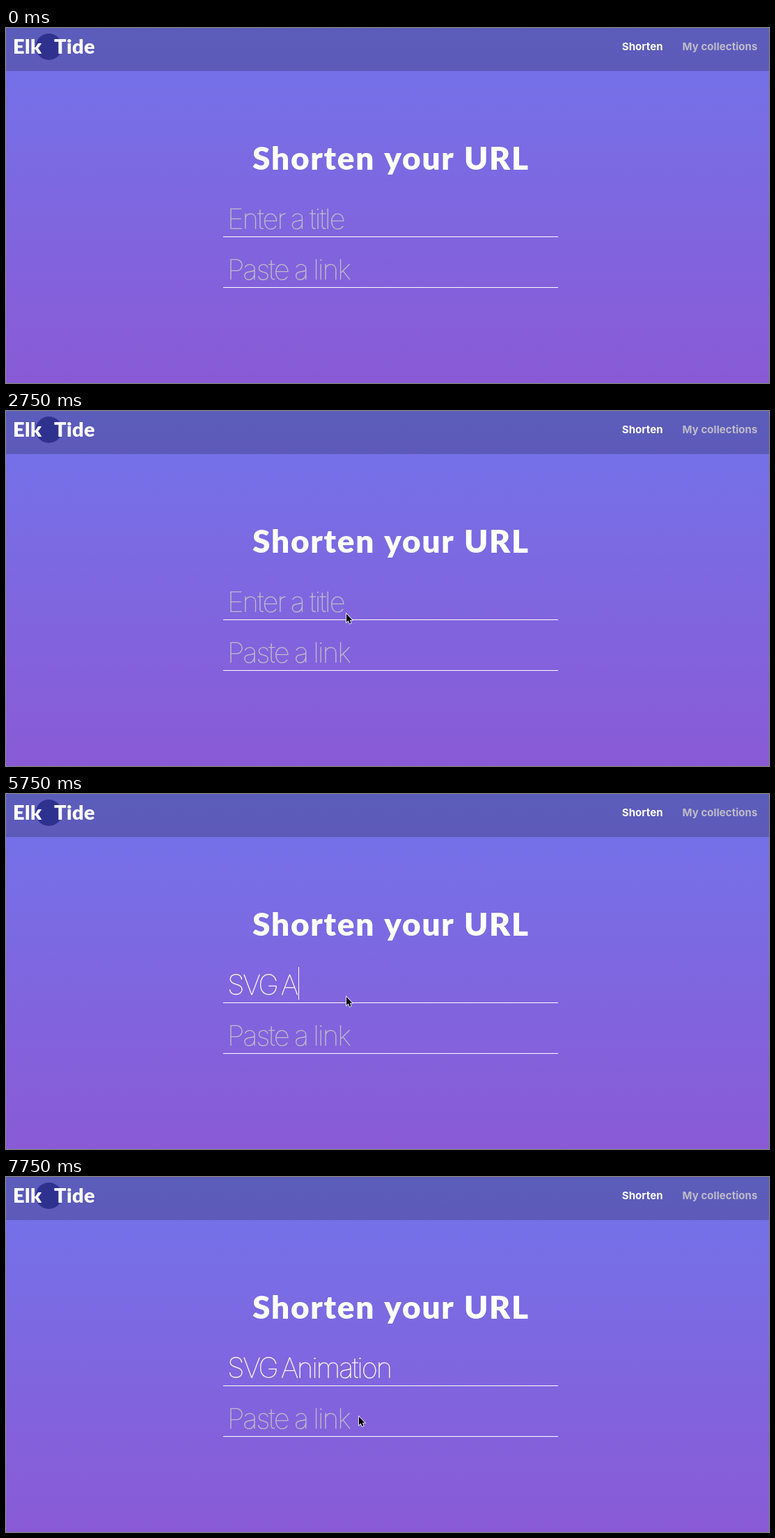
These frames come from a looping animation (1096 px wide and 511 px high, 8 s). An HTML page:

```html
<!DOCTYPE html>
<html lang="en">
<head>
<meta charset="utf-8">
<title>Shorten your URL</title>
<style>
  html, body { margin: 0; width: 100%; height: 100%; overflow: hidden; }
  svg { display: block; width: 1096px; height: 511px; background: linear-gradient(#7274ea, #8a5ad6); }
  text { fill: #fff; white-space: pre; font-optical-sizing: none; }
  .brand { font: 900 29px Lato, sans-serif; letter-spacing: .4px; }
  .nav { font: 700 15px Inter, sans-serif; letter-spacing: .05px; }
  .heading { font: 900 46px Lato, sans-serif; letter-spacing: 1.7px; word-spacing: 2px; text-anchor: middle; }
  .field { font: 130 40px Inter, sans-serif; letter-spacing: -2.2px; word-spacing: -4px; stroke: #fff; stroke-width: .4px; }
  .nav.muted { fill: #bebcc8; }
  .field.muted { fill: #c4c0c6; stroke: #c4c0c6; letter-spacing: -1.9px; word-spacing: -1.2px; }
</style>
</head>
<body>
<svg viewBox="0 0 1096 511">
  <rect width="1096" height="62" fill="#000" opacity=".2"/>
  <circle cx="61.5" cy="27" r="19" fill="#2f318f"/>
  <text class="brand" x="10" y="37">Elk</text>
  <text class="brand" x="69" y="37">Tide</text>
  <text class="nav" x="884.8" y="32">Shorten</text>
  <text class="nav muted" x="971.6" y="32">My collections</text>
  <text class="heading" x="553" y="204">Shorten your URL</text>
  <text class="field" id="title" x="318" y="289"></text>
  <text class="field muted" x="318" y="362">Paste a link</text>
  <path d="M312 300.5H793M312 373.5H793" stroke="#fff"/>
  <rect id="caret" y="249" width="1" height="47" fill="#fff"/>
  <path id="pointer" d="M0 0V12L2.7 9.6 4.6 13.9 6.6 13 4.8 8.8H8.4Z" stroke="#fff" paint-order="stroke" stroke-width="1.6"/>
</svg>
<script>
const LOOP = 8000;
const [title, caret, pointer] = ['title', 'caret', 'pointer'].map(id => document.getElementById(id));

// Each step is [start ms, ...values] and holds until the next one.
const pointerSteps = [
  [0], [1000, 511, 298], [1250, 444, 293], [1500, 442.5, 288], [1750, 443, 286],
  [2000, 443.5, 268], [2250], [2750, 489, 292], [7500, 535, 341], [7750, 507, 345]
];
const typingSteps = [
  [0, ''], [4750, 'S'], [5000, 'SV'], [5250, 'SVG'], [5500, 'SVG '], [5750, 'SVG A'],
  [6000, 'SVG Ani'], [6250, 'SVG Anima'], [6750, 'SVG Animatio'], [7000, 'SVG Animation']
];
const caretSteps = [
  [0, false], [2250, true], [2750, false], [3250, true], [3750, false], [4250, true], [7500, false]
];
const valuesAt = (steps, t) => steps.findLast(step => step[0] <= t).slice(1);
const show = (element, visible) => element.setAttribute('visibility', visible ? 'visible' : 'hidden');

function draw(now) {
  const t = now % LOOP;
  const [typed] = valuesAt(typingSteps, t);
  const [caretOn] = valuesAt(caretSteps, t);
  const [x, y] = valuesAt(pointerSteps, t);

  title.textContent = typed || 'Enter a title';
  title.classList.toggle('muted', !typed);
  caret.setAttribute('x', 320 + (typed ? Math.round(title.getComputedTextLength()) : 0));
  show(caret, caretOn);
  show(pointer, x !== undefined);
  if (x !== undefined) pointer.setAttribute('transform', `translate(${x} ${y})`);
  requestAnimationFrame(draw);
}
requestAnimationFrame(draw);
</script>
</body>
</html>
```
